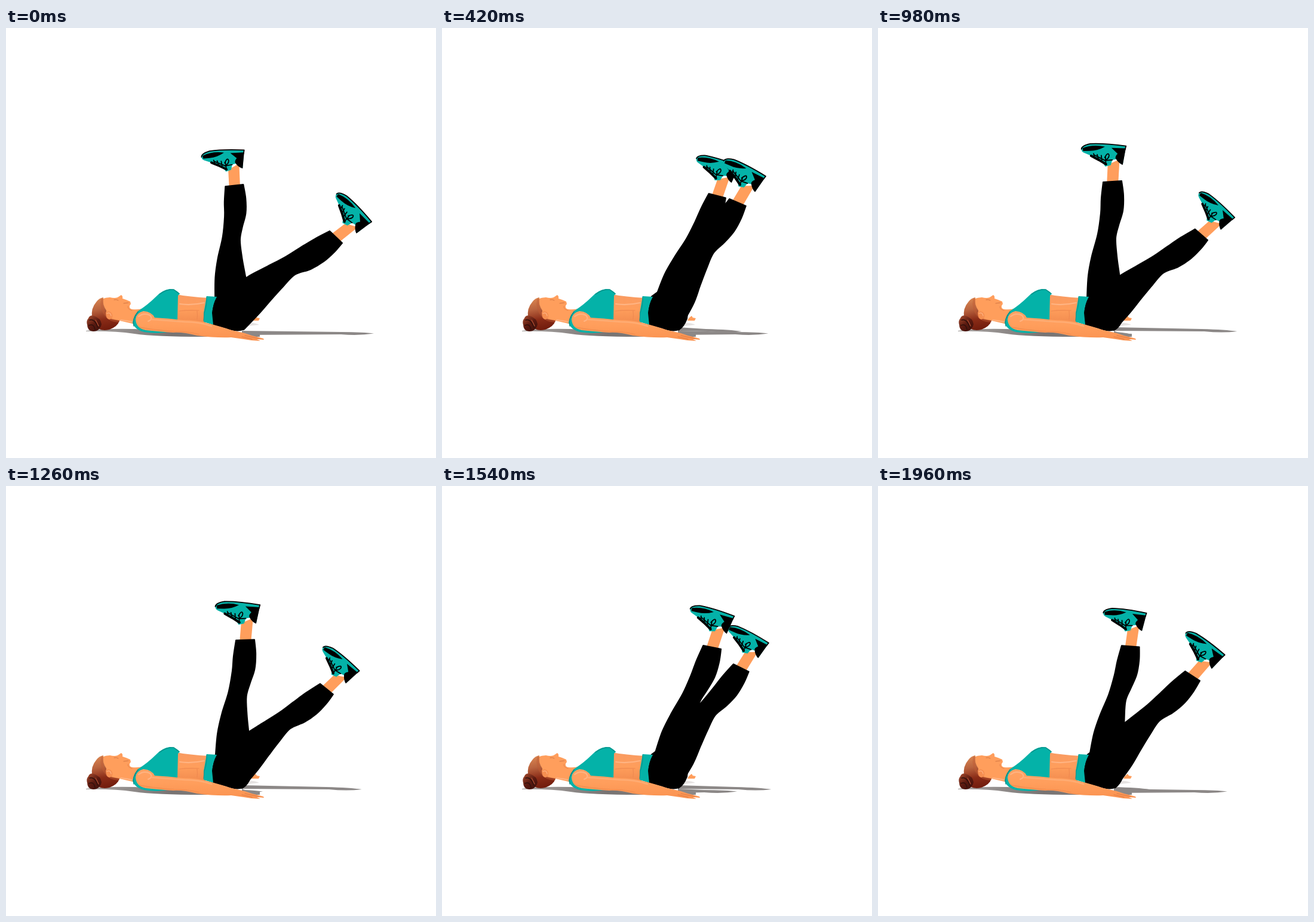
Animation of 720 by 720 pixels, one loop 2.1 s. Source, as an HTML page with a canvas:

```html
<!DOCTYPE html>
<html lang="en">
<head>
<meta charset="utf-8">
<title>Flutter kicks</title>
<style>
  html, body { margin: 0; width: 100%; height: 100%; overflow: hidden; background: #fff; }
  canvas { display: block; width: 720px; height: 720px; }
</style>
</head>
<body>
<canvas id="stage" width="720" height="720"></canvas>
<script>
const ctx = document.getElementById('stage').getContext('2d');
const TEAL = '#04b2a8', SKIN = '#ff9e5c', SHADE = '#e9854c', LIGHT = '#ffb483', GREY = '#8c8887';
const HIP = [385, 468], STEP = 140, FAR_SCALE = 0.967;

// Tilt of the near leg from vertical, in degrees, for each step of the loop.
const SWING = [54.9, 52.1, 43.4, 32, 23, 14.1, 6.3, 1.9, 1, 4.1, 9.8, 18.7, 27, 32, 43.4];

// Leg outline pairs: upright x, y, then lowered x, y.
const FRONT = [
  [350, 452, 375, 440], [352, 415, 404, 417], [358, 382, 436, 400], [368, 345, 468, 383],
  [373, 310, 492, 368], [374, 285, 517, 353], [377, 258, 542, 340]
];
const BACK = [
  [408, 256, 563, 360], [411, 280, 550, 375], [410, 306, 532, 391], [403, 330, 510, 404],
  [398, 352, 484, 413], [400, 382, 464, 433], [404, 412, 444, 455], [409, 450, 424, 478],
  [395, 506, 398, 505]
];

const mix = (a, b, t) => a + (b - a) * t;

function fill(d, color) {
  ctx.fillStyle = color;
  ctx.fill(new Path2D(d));
}

function line(d, color, width) {
  ctx.strokeStyle = color;
  ctx.lineWidth = width;
  ctx.lineCap = ctx.lineJoin = 'round';
  ctx.stroke(new Path2D(d));
}

function fade(x0, y0, x1, y1, ...colors) {
  const g = ctx.createLinearGradient(x0, y0, x1, y1);
  colors.forEach((c, i) => g.addColorStop(i / (colors.length - 1), c));
  return g;
}

// Turns an outline point around the hip between its two poses.
function swing([ax, ay, bx, by], t, scale) {
  const polar = (x, y) => [Math.hypot(x - HIP[0], y - HIP[1]), Math.atan2(x - HIP[0], HIP[1] - y)];
  const [ra, ta] = polar(ax, ay), [rb, tb] = polar(bx, by);
  const r = mix(ra, rb, t) * scale, tilt = mix(ta, tb, t);
  return [HIP[0] + r * Math.sin(tilt), HIP[1] - r * Math.cos(tilt)];
}

function curve(pts) {
  for (let i = 0; i < pts.length - 1; i++) {
    const p = pts[Math.max(i - 1, 0)], a = pts[i], b = pts[i + 1], n = pts[Math.min(i + 2, pts.length - 1)];
    ctx.bezierCurveTo(a[0] + (b[0] - p[0]) / 6, a[1] + (b[1] - p[1]) / 6,
      b[0] - (n[0] - a[0]) / 6, b[1] - (n[1] - a[1]) / 6, ...b);
  }
}

function poseLeg(angle, near) {
  const t = (angle - 1.9) / 53, scale = near ? 1 : FAR_SCALE;
  const front = FRONT.map(p => swing(p, t, scale));
  const back = BACK.map(p => swing(p, t, scale));
  const cuff = [0, 1].map(i => (front[front.length - 1][i] + back[0][i]) / 2);
  const tilt = (near ? 3 + 0.8 * angle : 0.83 * angle) * Math.PI / 180;
  const shift = 1 + 4 * t;
  const heel = cuff[0] + scale * ((18 + shift) * Math.cos(tilt) + 60 * Math.sin(tilt));
  return { front, back, cuff, tilt, shift, scale, heel };
}

function drawFoot({ cuff, tilt, shift, scale }) {
  ctx.save();
  ctx.translate(...cuff);
  ctx.rotate(tilt);
  ctx.scale(scale, scale);
  fill(`M-9 3 L10 3 L${8 + shift} -38 L${-11 + shift} -27 Z`, SKIN);
  ctx.translate(shift, 0);
  fill('M-57 -53 Q-54 -58 -36 -61 Q-12 -63 17 -61 L14 -30 Q9 -31 3 -38 L-4 -36 L-6 -27 L-15 -24 L-18 -28 Q-31 -38 -52 -44 Q-58 -46 -57 -53 Z', TEAL);
  fill('M-55 -52 Q-38 -60 -18 -57 Q-30 -49 -43 -48 L-54 -47 Z', '#000');
  fill('M-7 -56 L17 -57 L14 -29 Q7 -31 2 -38 Q-1 -41 4 -47 Z', '#000');
  line('M-57 -50 Q-57 -56 -43 -60 Q-20 -63 17 -61 L16 -55', '#000', 1.8);
  line('M-40 -40 L-26 -34 L-14 -28', '#000', 4);
  line('M-36 -44 L-34 -37 M-30 -43 L-27 -34 M-23 -42 L-21 -31 M-16 -41 L-14 -27 M-35 -42 L-16 -34 L-4 -36 M-17 -39 Q-12 -50 -10 -43 Q-10 -38 -15 -35', '#000', 1.8);
  ctx.restore();
}

function drawLeg(leg) {
  drawFoot(leg);
  ctx.beginPath();
  ctx.moveTo(...leg.front[0]);
  curve(leg.front);
  ctx.lineTo(...leg.back[0]);
  curve(leg.back);
  ctx.closePath();
  ctx.fillStyle = ctx.strokeStyle = '#000';
  ctx.lineWidth = 2;
  ctx.lineJoin = 'round';
  ctx.fill();
  ctx.stroke();
}

function drawShadows(near, far) {
  const grey = fade(135, 0, 420, 0, '#aaa5a3', '#777372', GREY);
  fill('M134 507 Q160 503 215 504 L330 509 L425 512 L425 517 L330 517 Q250 517 215 512 Q180 507 134 508 Z', grey);
  fill('M405 494 Q416 493 424 497 L405 499 Z', '#e5e2e1');
  const f = far.heel + 4, n = near.heel + 4;
  if (f > 430) fill(`M395 501 L${f - 60} 504 Q${f - 18} 505 ${f} 508 Q${f - 25} 511 ${f - 55} 508 L395 507 Z`, GREY);
  if (n > 412) fill(`M395 507 L${Math.max(400, n - 55)} 509 Q${n - 18} 509 ${n} 511.5 Q${n - 25} 515.5 ${Math.max(400, n - 55)} 513 L395 514 Z`, GREY);
}

function drawHead() {
  fill('M152 461 Q160 451 174 451 Q182 453 187 451 L193 447 Q196 449 195 453 L201 455 L208 458 L209 462 L207 465 Q206 470 211 471 Q220 472 228 470 L232 486 L216 496 L190 490 L165 500 L146 482 Z', SKIN);
  const hair = fade(157, 452, 168, 506, '#d98450', '#b9643f', '#8a2c17', '#701b0c');
  fill('M144 485 Q142 469 151 459 Q156 452 163 451 Q161 463 168 473 Q166 484 178 488 L190 490 Q187 500 173 505 Q157 509 149 498 Z', hair);
  line('M161 455 Q158 470 168 482 Q174 490 188 491', 'rgba(190,92,52,.45)', 4);
  fill('M147 482 Q159 486 160 496 Q157 508 146 508 Q136 507 136 497 Q134 490 138 486 Q140 480 147 482 Z', fade(137, 483, 157, 508, '#a1482c', '#5b1a10', '#3e100b'));
  line('M140 489 Q148 486 154 501 M139 498 Q147 494 149 505', '#30100c', 1.5);
  line('M150 489 Q153 494 155 499', '#b05133', 1.3);
  fill('M167 476 Q174 472 178 479 Q180 487 173 488 Q167 487 167 476 Z', '#f58f51');
  line('M169 478 Q175 475 176 482', LIGHT, 1.2);
  line('M181 455 Q185 454 188 456 M197 461 L205 460', '#d47642', 1);
  line('M204 466 Q203 471 211 473', SHADE, 1);
  line('M192 489 Q203 490 215 493', LIGHT, 2);
}

function drawTorso() {
  fill('M413 486 L418 482 L420 485 L425 486 L423 490 L411 490 Z', SKIN);
  fill('M285 446 Q306 450 340 452 L334 494 L280 494 Z', fade(0, 447, 0, 494, '#f99b62', SKIN, '#f28c4f'));
  line('M290 474 Q305 472 323 473 M320 474 Q321 482 320 488', '#ef8a50', 1.2);
  line('M291 462 Q310 465 332 460', LIGHT, 2);
  drawHead();
  fill('M221 474 Q238 463 251 450 Q261 439 274 437 Q283 436 291 445 L288 448 L287 491 L276 508 Q254 513 231 509 Q214 504 212 493 Q214 482 221 474 Z', TEAL);
  line('M257 446 Q269 437 281 438 L290 445', '#078f88', 1.3);
  line('M221 475 Q211 487 214 499', '#078b84', 1.3);
}

function drawArm() {
  fill('M217 488 Q218 477 230 474 Q244 475 249 485 Q270 486 296 489 Q317 489 337 494 Q360 500 378 506 L400 511 Q411 515 420 517 L431 520 L432 522 L420 521 L426 524 L411 523 L398 521 L377 518 Q350 519 320 515 Q297 509 280 510 Q252 508 234 506 Q218 503 217 488 Z', fade(0, 475, 0, 520, '#ffa264', SKIN, '#fb9452'));
  line('M222 483 Q231 476 241 481 Q247 488 238 491', LIGHT, 2);
  line('M244 488 Q273 490 299 492 Q324 492 344 499', '#ffac73', 2.5);
  line('M224 501 Q250 506 281 508 Q304 508 323 513', '#f18a4c', 1.2);
  line('M400 515 L423 520 M395 517 L412 521', '#da7944', 0.9);
}

function draw(time) {
  const angle = SWING[Math.floor(time / STEP) % SWING.length];
  const near = poseLeg(angle, true), far = poseLeg(54 - angle, false);
  ctx.fillStyle = '#fff';
  ctx.fillRect(0, 0, 720, 720);
  drawShadows(near, far);
  drawTorso();
  drawLeg(far);
  drawLeg(near);
  fill('M350 449 L344 478 L345 497 L368 503 Q385 510 397 506 Q405 502 411 487 L413 470 L400 435 L365 438 Z', '#000');
  fill('M336 449 L353 450 Q346 463 345 477 L347 497 L331 492 L331 477 Z', TEAL);
  line('M336 450 Q337 463 332 477 L331 490', '#098f86', 1);
  drawArm();
}

function tick() {
  draw(performance.now());
  requestAnimationFrame(tick);
}
tick();
</script>
</body>
</html>
```
